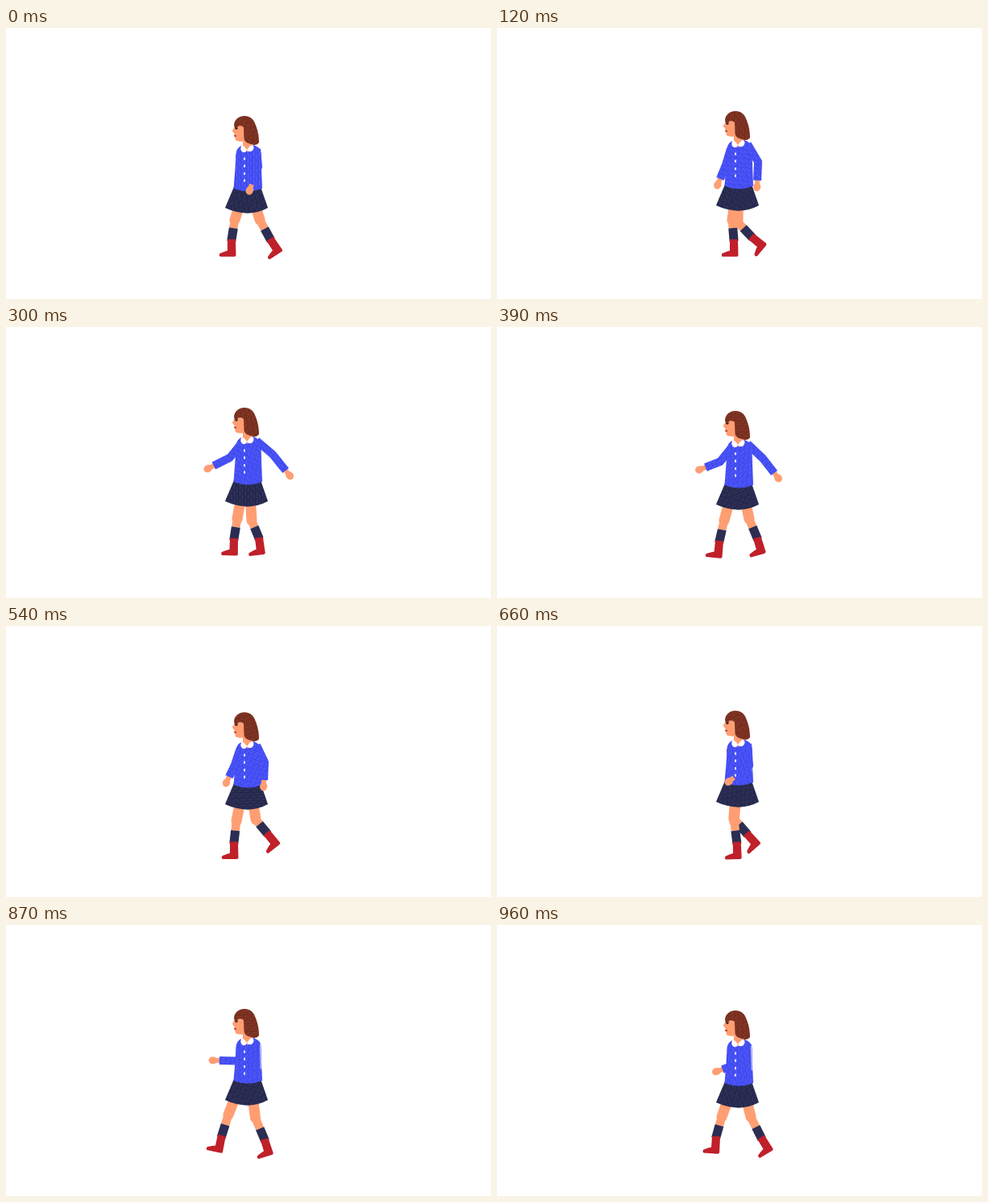
An HTML page that plays this animation: 600x336 px, repeating every 1.02 s.

```html
<!DOCTYPE html>
<html lang="en">
<head>
<meta charset="utf-8">
<title>Walking girl</title>
<style>
  html, body { margin: 0; width: 100%; height: 100%; overflow: hidden; background: #fff; }
  svg { display: block; width: 100vw; height: 100vh; }
</style>
</head>
<body>
<svg id="stage" viewBox="0 0 600 336" xmlns="http://www.w3.org/2000/svg">
  <defs id="defs"></defs>
</svg>
<script>
const LOOP = 1020, STEP = 30, LAST = 32;
const SKIN = '#ff9e72', RED = '#c0202a', SOCK = '#2b2e52';
const NS = 'http://www.w3.org/2000/svg';
const stage = document.getElementById('stage');
const defs = document.getElementById('defs');

function make(tag, attrs, parent = stage) {
  const el = document.createElementNS(NS, tag);
  set(el, attrs);
  parent.appendChild(el);
  return el;
}
function set(el, attrs) {
  for (const k in attrs) el.setAttribute(k, attrs[k]);
}

// Crayon fills: a flat tone with faint strokes whose direction changes
function crayon(id, base, light, dark) {
  const p = make('pattern', { id, width: 9, height: 7, patternUnits: 'userSpaceOnUse' }, defs);
  make('rect', { width: 9, height: 7, fill: base }, p);
  make('path', { d: 'M0 1.5H6M4 5H9', stroke: light, 'stroke-width': 1 }, p);
  make('path', { d: 'M2 3.3H8', stroke: dark, 'stroke-width': .8 }, p);
  return p;
}
const crayons = [
  crayon('blue', '#444df3', '#5660f8', '#3a42e6'),
  crayon('navy', '#272a4e', '#343862', '#20233f'),
  crayon('hair', '#7a3020', '#8a3c2a', '#6c281a')
];

// Keys: time, then the animated values
const bodyKeys = [ // head top, hem
  [0, 109, 229], [120, 103, 226], [210, 98.5, 222], [300, 100, 222], [390, 104, 226],
  [540, 107, 227], [660, 105, 224], [780, 104, 222], [870, 104, 223], [960, 106, 226]
];
const farLegKeys = [ // knee x y, ankle x y, boot angle
  [0, 283, 238, 279, 263, 0], [120, 291, 238, 293, 263, 0], [300, 304, 240, 313, 262, -7],
  [390, 312, 238, 322, 262, -16], [540, 309, 240, 323, 257, -38], [630, 298, 240, 314, 258, -48],
  [710, 284, 235, 299, 257, -22], [780, 277, 232, 281, 261, 8], [880, 275, 236, 266, 262, 12],
  [960, 278, 238, 271, 263, 4]
];
const nearLegKeys = [
  [0, 314, 238, 327, 262, -33], [120, 298, 241, 315, 259, -50], [210, 289, 238, 299, 258, -24],
  [300, 286, 238, 282, 263, 2], [390, 281, 240, 275, 266, 6], [450, 281, 241, 273, 267, 6],
  [540, 285, 242, 282, 268.5, 0], [780, 302, 240, 311, 268, -5], [960, 314, 238, 327, 264, -31]
];
const nearArmKeys = [ // elbow x y, cuff x y
  [0, 312, 172, 304, 194], [120, 323, 166, 322, 189], [300, 330, 158, 346, 178],
  [345, 331, 160, 348, 179], [390, 329, 163, 343, 181], [540, 320, 169, 319, 191],
  [660, 312, 173, 293, 188], [780, 306, 168, 270, 165], [870, 304, 169, 264, 168],
  [960, 305, 170, 279, 179]
];
const farArmKeys = [
  [0, 292, 172, 290, 188], [120, 283, 170, 276, 187], [300, 277, 162, 257, 172],
  [345, 276, 164, 255, 173], [390, 276, 167, 258, 174], [540, 283, 172, 276, 187],
  [640, 292, 172, 291, 188], [900, 298, 172, 298, 188]
];

// Smooth periodic interpolation through the keys
function sample(keys, t) {
  const n = keys.length;
  const key = i => {
    const turn = Math.floor(i / n), k = keys[i - turn * n];
    return [k[0] + turn * LOOP, ...k.slice(1)];
  };
  let i = n - 1;
  while (keys[i][0] > t) i--;
  const [a, b, c, d] = [key(i - 1), key(i), key(i + 1), key(i + 2)];
  const span = c[0] - b[0], u = (t - b[0]) / span, v = 1 - u;
  return b.slice(1).map((p, j) => {
    const q = c[j + 1];
    const m = (q - a[j + 1]) / (c[0] - a[0]) * span;
    const w = (d[j + 1] - p) / (d[0] - b[0]) * span;
    return v * v * (1 + 2 * u) * p + u * u * (3 - 2 * u) * q + u * v * v * m - u * u * v * w;
  });
}

function stroke(color, width, cap = 'round') {
  return make('path', {
    fill: 'none', stroke: color, 'stroke-width': width,
    'stroke-linecap': cap, 'stroke-linejoin': 'round'
  });
}
const shape = (fill, d = '', parent) => make('path', { fill, d }, parent);
const line = (...pts) => 'M' + pts.map(p => p.map(v => v.toFixed(2)).join(' ')).join('L');

function arm() {
  const wrist = stroke(SKIN, 6);
  const hand = make('ellipse', { rx: 5.4, ry: 4.6, fill: SKIN });
  const sleeve = stroke('url(#blue)', 10, 'butt');
  return (shoulder, [ex, ey, cx, cy]) => {
    const len = Math.hypot(cx - ex, cy - ey);
    const dx = (cx - ex) / len, dy = (cy - ey) / len;
    const hx = cx + dx * 8, hy = cy + dy * 8;
    set(sleeve, { d: line(shoulder, [ex, ey], [cx, cy]) });
    set(wrist, { d: line([cx - dx * 2, cy - dy * 2], [hx, hy]) });
    set(hand, { transform: `translate(${hx} ${hy}) rotate(${Math.atan2(dy, dx) * 180 / Math.PI})` });
  };
}

function leg() {
  const thigh = stroke(SKIN, 13), shin = stroke(SKIN, 10.5, 'butt');
  const sock = stroke(SOCK, 11, 'butt');
  const boot = shape(RED, 'M-5-1L5-1L5.5 19Q5 20.5 3 20.5L-14 20.5Q-16 19-14.5 16.5Q-9 14-5 13Z');
  return (hem, [kx, ky, ax, ay, angle]) => {
    const knee = [kx, ky], ankle = [ax, ay];
    const f = 15 / Math.hypot(ax - kx, ay - ky);
    const top = [ax + (kx - ax) * f, ay + (ky - ay) * f];
    set(thigh, { d: line([299 + (kx - 299) * .7, hem - 6], knee) });
    set(shin, { d: line(knee, top) });
    set(sock, { d: line(top, [ax + (ax - kx) * .06, ay + (ay - ky) * .06]) });
    set(boot, { transform: `translate(${ankle}) rotate(${angle})` });
  };
}

// Painted from back to front
const farArm = arm();
const farLeg = leg();
const nearLeg = leg();
const skirt = shape('url(#navy)');
const torso = shape('url(#blue)');
const edge = stroke('#c9ccff', 1.2);
const nearArm = arm();
const head = make('g', {});
shape(SKIN, 'M293 24L303 24L304 39L299 45L293 38Z', head);
shape('#fff', 'M291 37Q294 36 298 42Q297 46 293 45Q289 43 291 37Z' +
  'M298 42Q302 36 305 36Q308 39 305 43Q301 46 298 42Z', head);
shape(SKIN, 'M283 9L297 9L299 30Q292 33 286 31Q283 30 283.5 27L282 25L282.5 22L280 19Q280 17 282 15Z', head);
shape('url(#hair)', 'M282 11C283 4 288 0 295 0C303 0 307 5 309.500 13C312 20 313 26 313 33' +
  'C311 36 307 37 303 35C299 34 295 32 294.500 28L294 14C291 11 286 12 283 15Z', head);
make('path', { d: 'M283.500 13.800Q286 12.800 287 13.800', fill: 'none', stroke: '#552519' }, head);
make('ellipse', { cx: 285, cy: 15.5, rx: 1.6, ry: 1.2, fill: '#251a22' }, head);
make('path', { d: 'M282.500 24.500L285 25', stroke: '#b02a2c', 'stroke-width': 1.4 }, head);
for (const y of [53, 62, 71.5, 80]) {
  make('rect', { x: 294, y: y - 1.5, width: 2, height: 3.2, rx: .6, fill: '#fff' }, head);
}

function draw(frame) {
  const t = frame * STEP;
  const [top, hem] = sample(bodyKeys, t);
  const near = sample(nearArmKeys, t);
  const waist = hem - 30;

  set(head, { transform: `translate(0 ${top})` });
  set(torso, { d: `M291 ${top + 37}Q285 ${top + 40} 284.500 ${top + 47}L283.500 ${top + 66}` +
    `L281.500 ${waist}Q299 ${waist + 7} 317 ${waist}L316 ${top + 66}L315.500 ${top + 46}` +
    `Q314 ${top + 38} 306 ${top + 36}Z` });
  set(skirt, { d: `M282 ${hem - 32}L315 ${hem - 32}L324 ${hem - 6}Q313 ${hem} 299 ${hem + .8}` +
    `Q284 ${hem} 271 ${hem - 6}Z` });
  set(edge, {
    d: line([314.5, top + 43], [315.2, top + 74]),
    opacity: Math.max(0, Math.min(1, (305 - near[2]) / 20))
  });

  farArm([289, top + 47], sample(farArmKeys, t));
  nearArm([310, top + 41], near);
  farLeg(hem, sample(farLegKeys, t));
  nearLeg(hem, sample(nearLegKeys, t));

  const mark = Math.floor(frame / 2);
  crayons.forEach((p, i) => set(p, {
    patternTransform: `rotate(${(90 + mark * 67 + i * 25) % 180}) translate(${mark * 3} ${mark * 2})`
  }));
}

function tick(now) {
  draw(Math.min(LAST, Math.floor(now % LOOP / STEP)));
  requestAnimationFrame(tick);
}
let start;
draw(0);
requestAnimationFrame(function begin(now) {
  start = now;
  requestAnimationFrame(function loop(time) {
    draw(Math.min(LAST, Math.floor((time - start) % LOOP / STEP)));
    requestAnimationFrame(loop);
  });
});
</script>
</body>
</html>
```
